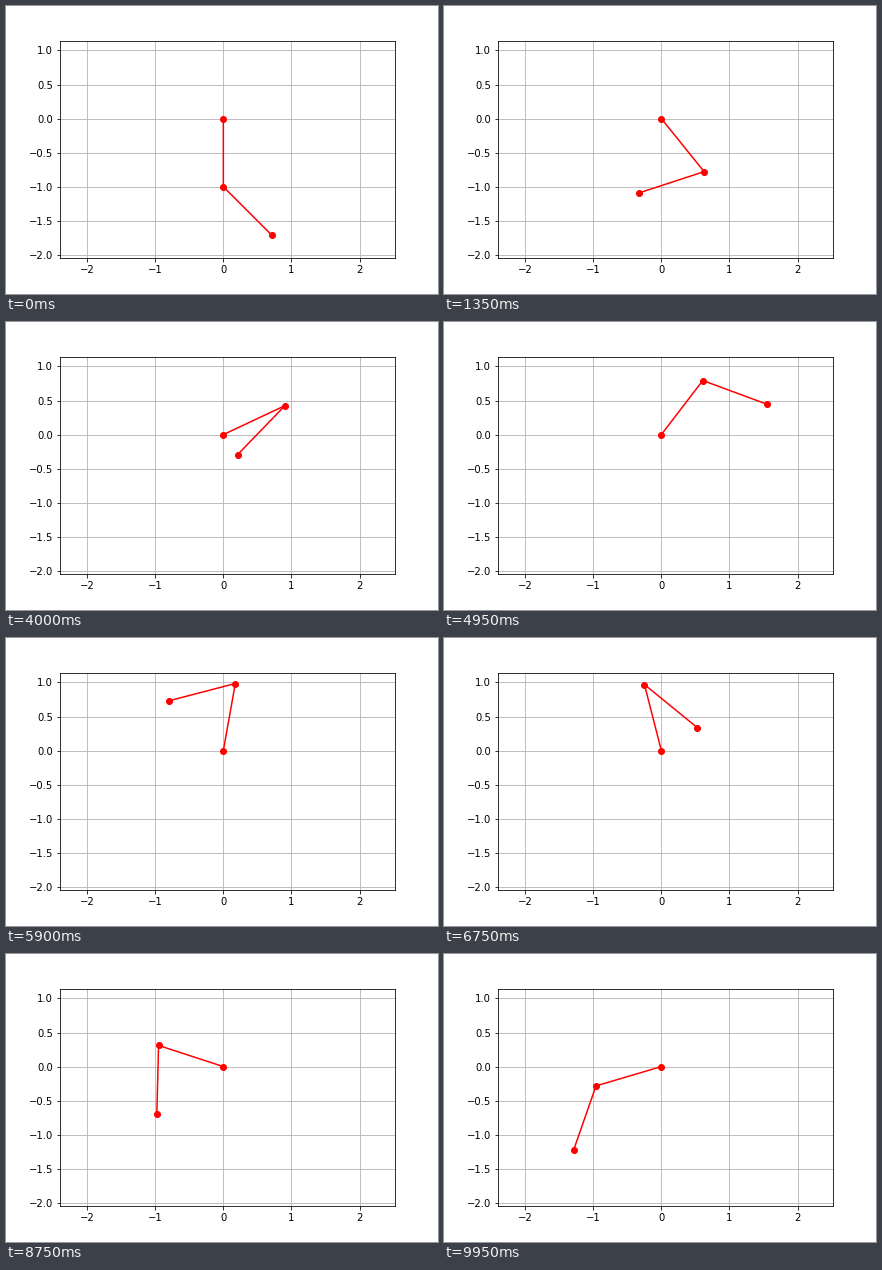
Animation, 432 px wide and 288 px high, one loop 10 s. Source, as a matplotlib script:

```python
import numpy as np
import matplotlib.pyplot as plt
from matplotlib.animation import FuncAnimation

FRAMES = 200
INTERVAL = 50
SPIN = 0.5        # angular speed of the driven rod, rad/s
GRAVITY = 9.8
SUBSTEPS = 10


def slope(t, state):
    angle, speed = state
    accel = -GRAVITY * np.sin(angle) + SPIN**2 * np.sin(SPIN * t - angle)
    return np.array([speed, accel])


def rk4_step(t, state, h):
    a = slope(t, state)
    b = slope(t + h / 2, state + h / 2 * a)
    c = slope(t + h / 2, state + h / 2 * b)
    d = slope(t + h, state + h * c)
    return state + h / 6 * (a + 2 * b + 2 * c + d)


def swing_angles(times):
    """Angle of the free rod, hung from the tip of the driven one."""
    state = np.array([np.pi / 4, 3.0])
    h = (times[1] - times[0]) / SUBSTEPS
    angles = [state[0]]
    for start in times[:-1]:
        for k in range(SUBSTEPS):
            state = rk4_step(start + k * h, state, h)
        angles.append(state[0])
    return np.array(angles)


times = np.linspace(0, 10, FRAMES)
drive = SPIN * times
swing = swing_angles(times)

zero = np.zeros(FRAMES)
x1, y1 = np.sin(drive), -np.cos(drive)
x2, y2 = x1 + np.sin(swing), y1 - np.cos(swing)
xs = np.column_stack([zero, x1, x2])
ys = np.column_stack([zero, y1, y2])

fig, ax = plt.subplots(figsize=(6, 4), dpi=72)
fig.subplots_adjust(left=0.125, right=0.9, bottom=0.125, top=0.88)

# Equal scale on both axes: y fits the data with a 5 % margin, x is centred.
margin = 0.05 * np.ptp(ys)
bottom, top = ys.min() - margin, ys.max() + margin
box = ax.get_position()
half = (top - bottom) * (box.width * 6) / (box.height * 4) / 2
middle = (xs.min() + xs.max()) / 2
ax.set_xlim(middle - half, middle + half)
ax.set_ylim(bottom, top)
ax.grid(True)

rods, = ax.plot(xs[0], ys[0], "ro-")


def update(i):
    rods.set_data(xs[i], ys[i])
    return rods,


anim = FuncAnimation(fig, update, frames=FRAMES, interval=INTERVAL,
                     repeat=True, repeat_delay=0)
plt.show()
```
